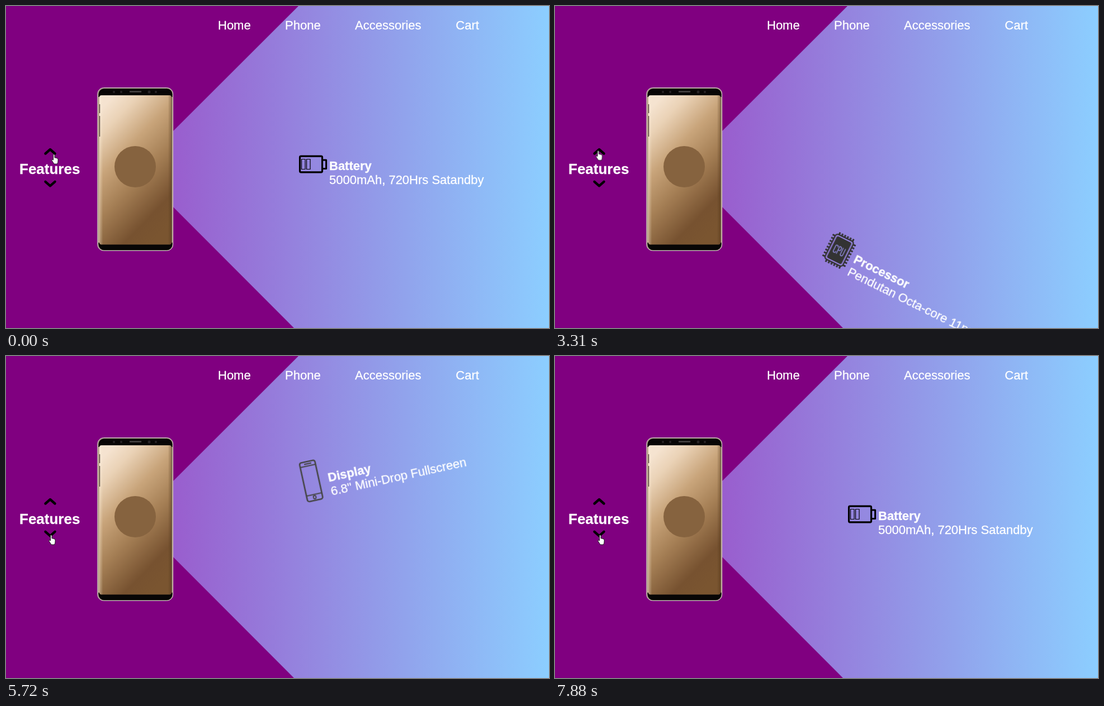
Animation of 971 by 577 pixels, one loop 8.58 s. Source, as an HTML page:

```html
<!DOCTYPE html>
<html lang="en">
<head>
<meta charset="utf-8">
<title>Phone features</title>
<style>
  html, body { margin: 0; width: 100%; height: 100%; overflow: hidden; background: purple; }
  svg { display: block; width: 100%; height: 100%; }
  text { font: 22px "Liberation Sans", Arial, sans-serif; fill: #fff; stroke: #fff; stroke-width: .3; }
  .bold { font-weight: bold; }
  .label { font-size: 26px; }
  .line { fill: none; stroke-linejoin: round; }

  #wheel { transform-origin: 231px 292px; animation: turn 8580ms ease infinite; }
  #cursor { animation: point 8580ms step-end infinite; }
  #press { animation: press 8580ms step-end infinite; }

  /* Two steps up, then two steps back, one second each */
  @keyframes turn {
    0%, 12.93% { transform: rotate(0deg); }
    24.58%, 33.72% { transform: rotate(-90deg); }
    45.37%, 60.05% { transform: rotate(-180deg); }
    71.7%, 79.9% { transform: rotate(-90deg); }
    91.55%, 100% { transform: rotate(0deg); }
  }
  @keyframes point {
    0% { transform: translate(81px, 265px); }
    1.51% { transform: translate(73px, 260px); }
    2.44% { transform: translate(67px, 255px); }
    5.94% { transform: translate(70px, 257px); }
    6.87% { transform: translate(71.5px, 258px); }
    8.85% { transform: translate(72.5px, 258.5px); }
    45.8% { transform: translate(73px, 263px); }
    46.73% { transform: translate(75px, 285px); }
    47.66% { transform: translate(77px, 310px); }
    48.48% { transform: translate(78px, 330px); }
    49.41% { transform: translate(78px, 339px); }
    51.16% { transform: translate(78.5px, 331px); }
    52.09% { transform: translate(78px, 326px); }
    54.77%, 100% { transform: translate(76px, 320px); }
  }
  @keyframes press {
    0% { opacity: 0; transform: translate(76.5px, 259px); }
    11.53% { opacity: 1; transform: translate(76.5px, 259px); }
    13.28% { opacity: 0; transform: translate(76.5px, 259px); }
    32.4% { opacity: 1; transform: translate(76.5px, 259px); }
    34.14% { opacity: 0; transform: translate(80px, 320px); }
    58.5% { opacity: 1; transform: translate(80px, 320px); }
    60.25% { opacity: 0; transform: translate(80px, 320px); }
    77.5% { opacity: 1; transform: translate(80px, 320px); }
    80.18%, 100% { opacity: 0; transform: translate(80px, 320px); }
  }
</style>
</head>
<body>
<svg viewBox="0 0 971 577" preserveAspectRatio="none">
  <defs>
    <linearGradient id="sky">
      <stop stop-color="#9f2cb8"/>
      <stop offset="1" stop-color="#8cceff"/>
    </linearGradient>
    <linearGradient id="screen" x1=".2" y1="0" x2=".7" y2="1">
      <stop stop-color="#f5e3d0"/>
      <stop offset=".14" stop-color="#ead2b6"/>
      <stop offset=".36" stop-color="#c8a47a"/>
      <stop offset=".58" stop-color="#a68056"/>
      <stop offset=".85" stop-color="#775230"/>
      <stop offset="1" stop-color="#7a5530"/>
    </linearGradient>
    <linearGradient id="rim">
      <stop stop-color="#fff2dc" stop-opacity=".4"/>
      <stop offset=".05" stop-color="#fff2dc" stop-opacity="0"/>
      <stop offset=".95" stop-color="#4a3015" stop-opacity="0"/>
      <stop offset="1" stop-color="#4a3015" stop-opacity=".4"/>
    </linearGradient>
  </defs>

  <rect width="971" height="577" fill="url(#sky)"/>

  <g id="wheel">
    <g id="battery">
      <g class="line" stroke="#000">
        <rect x="525.5" y="269.2" width="40" height="28.6" rx="2" stroke-width="3.2"/>
        <path d="M566 276H572.6V291.5H566" stroke-width="3"/>
        <path d="M528.5 274.5H535V292.5H528.5ZM537.5 274.5H544V292.5H537.5Z" stroke-width="1.2"/>
      </g>
      <text class="bold" x="578" y="294">Battery</text>
      <text x="578" y="319">5000mAh, 720Hrs Satandby</text>
    </g>

    <g id="display" transform="rotate(90 231 292)">
      <g class="line" stroke="#444">
        <rect x="539" y="257.2" width="28" height="71" rx="3.5" stroke-width="2.6"/>
        <path d="M539 265.3H567M539 317.5H567" stroke-width="2"/>
        <path d="M547 261.3H560" stroke-width="2.2"/>
        <ellipse cx="553" cy="322.5" rx="2.4" ry="3" stroke-width="1.8"/>
      </g>
      <text class="bold" x="583.5" y="301">Display</text>
      <text x="583.5" y="326">6.8" Mini-Drop Fullscreen</text>
    </g>

    <g id="processor" transform="rotate(180 231 292)">
      <g class="line" stroke="#333">
        <path d="M523.5 278V322M564.5 278V322" stroke-width="5" stroke-dasharray="3 2.85"/>
        <path d="M530 272.5H560M530 326.5H560" stroke-width="5" stroke-dasharray="3 2.4"/>
        <rect x="526.2" y="274.7" width="35.6" height="49.6" rx="5" stroke-width="2.4"/>
      </g>
      <rect x="529.5" y="278" width="29" height="43" rx="3" fill="#333"/>
      <path class="line" stroke="#918bdf" stroke-width="1.4"
        d="M539.5 296V294.5Q539.5 293 537.2 293T535 295V304.5Q535 307 537.2 307T539.5 305V303.5
          M542 307.5V293H544.5Q546.5 293 546.5 296.5T544.5 300H542
          M549 292.5V304.5Q549 307 551.2 307T553.5 304.5V292.5"/>
      <text class="bold" x="575.2" y="308">Processor</text>
      <text x="575.2" y="333">Pendutan Octa-core 11nm</text>
    </g>
  </g>

  <path d="M0 0H523L231 292L515 577H0Z" fill="purple"/>

  <g id="phone">
    <rect x="163.7" y="146.5" width="135" height="292" rx="11" fill="#a08c7a" stroke="#cfc2c8"/>
    <rect x="165.5" y="148" width="132" height="289.5" rx="10" fill="#080606"/>
    <path d="M166 163V424M297.5 163V424" stroke="#c4ae94" stroke-width="2"/>
    <rect x="167" y="160" width="129" height="267.5" rx="4" fill="url(#screen)"/>
    <rect x="167" y="160" width="129" height="267.5" rx="4" fill="url(#rim)"/>
    <path d="M167.5 176V192M167.5 197V234" stroke="#41352f" stroke-width="1.2"/>
    <path d="M222 153.5H241" stroke="#4a4747" stroke-width="2.5" stroke-linecap="round"/>
    <g fill="#292528">
      <circle cx="193" cy="154" r="2"/>
      <circle cx="206" cy="154" r="2"/>
      <circle cx="256" cy="154" r="2.5"/>
      <circle cx="268" cy="154" r="2"/>
    </g>
    <circle cx="231" cy="288" r="37" fill="#86633f"/>
  </g>

  <g id="menu">
    <text x="379" y="42">Home</text>
    <text x="499" y="42">Phone</text>
    <text x="624" y="42">Accessories</text>
    <text x="804.3" y="42">Cart</text>
  </g>

  <text class="bold label" x="24" y="301">Features</text>
  <g class="line" stroke="#000" stroke-width="4.4" stroke-linecap="round">
    <path d="M70.5 264.5L79 257L87.5 264.5"/>
    <path d="M70.5 314.8L79 322.3L87.5 314.8"/>
  </g>

  <circle id="press" r="11.2" fill="#ffd400" fill-opacity=".5"/>
  <path id="cursor" fill="#fff" stroke="#111" stroke-width=".9"
    d="M3.5 11V2Q3.5 .7 4.7 .7T6 2V7Q7.3 6.2 8 7.3 9.3 6.7 10 8 11.6 7.5 12 9V13Q12 15.5 10.5 18H5Q3.5 15.5 .8 11.5 .6 9.6 2 10Z"/>
</svg>
</body>
</html>
```
